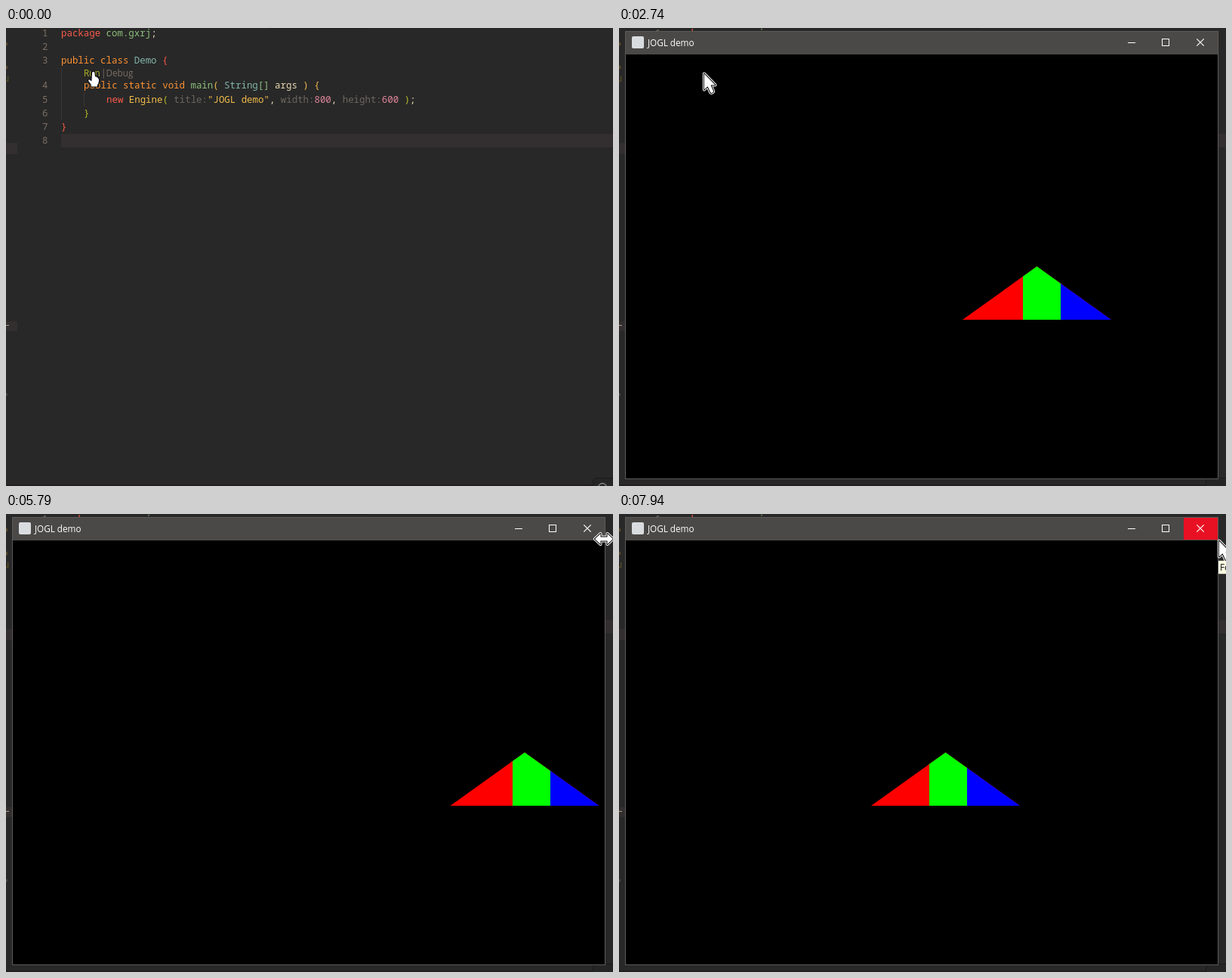
An HTML page for the animation above (8 s loop, 804 by 606 pixels).

```html
<!DOCTYPE html>
<html lang="en">
<head>
<meta charset="utf-8">
<title>JOGL demo</title>
<style>
  html, body { margin: 0; width: 100%; height: 100%; overflow: hidden; background: #282828; }
  svg { display: block; width: 804px; height: 606px; }
  text { white-space: pre; }
  .code { font: 12.42px "Noto Sans Mono", "DejaVu Sans Mono", monospace; fill: #ebdbb2; }
  .ui { font: 11.7px "Open Sans", "Noto Sans", sans-serif; }
  .num { fill: #7c6f64; text-anchor: end; }
  .red { fill: #fb5a4a; }
  .orange { fill: #fe9232; }
  .yellow { fill: #f2bd4b; }
  .green { fill: #b8bb26; }
  .aqua { fill: #8ec07c; }
  .blue { fill: #83b5a8; }
  .pink { fill: #e0869b; }
  .hint { fill: #6e665f; }
  .guide { fill: #3a3735; }
  .line { fill: #332e2f; }
  .crisp { shape-rendering: crispEdges; }
  .icon { fill: none; stroke: #fff; }
  .halo { fill: none; stroke: #fff; stroke-width: 4; stroke-linejoin: round; }
  .body { fill: #fff; stroke: #000; stroke-width: 2; stroke-linejoin: round; paint-order: stroke; }
</style>
</head>
<body>
<svg viewBox="0 0 804 606">
  <defs>
    <clipPath id="view"><rect x="9" y="35" width="784" height="561"/></clipPath>
    <clipPath id="shape"><path id="outline"/></clipPath>
    <path id="arrowPath" d="M1.8 3.5V24.5L6.5 20.3L10.3 28.6Q12.5 29.8 14.2 27L10.5 18.5H16.5Z"/>
    <path id="resizePath" d="M-12 0L-4.5 -7V-2.6H4.5V-7L12 0L4.5 7V2.6H-4.5V7Z"/>
  </defs>

  <rect width="804" height="606" fill="#282828"/>
  <rect x="348" width="132" height="1" fill="#222"/>
  <rect y="604" width="804" height="2" fill="#241e21"/>

  <g id="sidebar">
    <circle cx="0" cy="21" r="2.5" fill="#50452c"/>
    <circle cx="0" cy="52" r="2.5" fill="#50452c"/>
    <text class="ui" x="-3" y="71" fill="#66581f">u</text>
    <rect class="line" y="152" width="15" height="15"/>
    <rect class="line" y="388" width="15" height="13"/>
    <rect y="393" width="4" height="1" fill="#a89984"/>
    <circle cx="0" cy="485" r="2" fill="#4a4846"/>
  </g>

  <g class="crisp">
    <rect class="line" x="73" y="140" width="731" height="18"/>
    <rect class="guide" x="73" y="52" width="1" height="70"/>
    <rect class="guide" x="103" y="85" width="1" height="19"/>
    <rect id="caret" x="73" y="140" width="1" height="18" fill="#ebdbb2"/>
  </g>

  <g class="code" id="numbers"></g>
  <g class="code">
    <text x="73" y="11"><tspan class="red">package </tspan><tspan class="aqua">com.gxrj</tspan>;</text>
    <text x="73" y="47"><tspan class="orange">public class </tspan><tspan class="blue">Demo </tspan><tspan class="red">{</tspan></text>
    <text x="103" y="80"><tspan class="orange">public static void </tspan><tspan class="aqua">main</tspan><tspan class="yellow">( </tspan><tspan class="blue">String</tspan><tspan class="aqua">[]</tspan> args <tspan class="yellow">) {</tspan></text>
    <text x="133" y="99"><tspan class="red">new </tspan><tspan class="yellow">Engine</tspan><tspan class="green">( </tspan><tspan class="hint">title:</tspan><tspan class="yellow">"JOGL demo"</tspan>, <tspan class="hint">width:</tspan><tspan class="pink">800</tspan>, <tspan class="hint">height:</tspan><tspan class="pink">600</tspan><tspan class="green"> )</tspan>;</text>
    <text class="green" x="103" y="117">}</text>
    <text class="red" x="73" y="135">}</text>
  </g>
  <g class="ui" fill="#7c6f64">
    <text class="green" x="103" y="64">Run</text>
    <text x="126" y="64">|</text>
    <text x="132.5" y="64">Debug</text>
  </g>

  <rect x="777.5" y="595.5" width="40" height="30" rx="4" fill="#252525" stroke="#1b1b1b"/>
  <circle id="badge" cx="790" cy="608" r="5.5" fill="none" stroke="#8a8a8a" stroke-width="1.3"/>

  <g id="hand" transform="translate(108 56)">
    <path class="body" d="M6.2 2.4Q8.2 .6 9.4 3L10 8.6Q11.6 7.6 12.4 9.4Q14 9 14.2 11Q15.4 11.2 15 14Q14.6 18 13 19.5V21.5H4.8V19L1.2 14Q.8 12 2.8 12.4L5.4 14.4Z"/>
  </g>

  <g id="window">
    <g class="crisp">
      <rect x="8.5" y="4.5" width="785" height="592" fill="#000" stroke="#5c5b59"/>
      <rect x="9" y="5" width="784" height="30" fill="#4b4947"/>
      <rect id="closeHover" x="748" y="5" width="45" height="29" fill="#e81123"/>
    </g>
    <rect x="17" y="11" width="16" height="16" rx="2" fill="#d9dcdf"/>
    <text class="ui" x="38" y="24" fill="#fff">JOGL demo</text>
    <path class="icon crisp" d="M674 19.5H684M719.5 14.5H728.5V23.5H719.5Z"/>
    <path class="icon" d="M765.3 14.3L774.7 23.7M774.7 14.3L765.3 23.7" stroke-width="1.2"/>
    <g id="triangle" class="crisp" clip-path="url(#view)">
      <g clip-path="url(#shape)">
        <rect y="310" width="804" height="80" fill="#f00"/>
        <rect id="blue" y="310" width="804" height="80" fill="#00f"/>
        <rect id="green" y="310" width="50" height="80" fill="#0f0"/>
      </g>
    </g>
    <g id="tip">
      <rect x="793.5" y="61.5" width="50" height="18" fill="#ffffe1" stroke="#555"/>
      <text class="ui" x="796" y="75" fill="#111">Fermer</text>
    </g>
    <g id="arrow"><use href="#arrowPath" class="halo"/><use href="#arrowPath" class="body"/></g>
    <g id="resize"><use href="#resizePath" class="halo"/><use href="#resizePath" class="body"/></g>
  </g>
</svg>
<script>
  const LOOP = 8000, OPEN = 1400;
  const el = id => document.getElementById(id);
  const show = (id, on) => el(id).setAttribute('visibility', on ? 'inherit' : 'hidden');
  const move = (id, x, y) => el(id).setAttribute('transform', `translate(${Math.round(x)} ${Math.round(y)})`);

  [11, 29, 47, 80, 99, 117, 135, 153].forEach((y, i) => {
    el('numbers').insertAdjacentHTML('beforeend', `<text class="num" x="55.5" y="${y}">${i + 1}</text>`);
  });

  // Screen refresh: [start, interval]
  const refresh = [[1400, 60], [1520, 40], [1560, 640 / 11], [2200, 60], [4780, 800 / 13],
                   [5580, 60], [5640, 50], [5790, 40], [5830, 61], [6440, 60]];
  // Keys: [time, value, ...]
  const apex = [[1426, 401.5], [1520, 412.5], [2740, 553.5], [3040, 589], [3640, 655.5], [3880, 687],
                [4833, 798], [5580, 711], [5790, 687], [6440, 609], [7100, 534], [7280, 511], [7940, 432.5]];
  const pointer = [[2980, 111, 57], [3040, 122, 57], [3340, 330, 105], [3640, 550, 163], [3880, 645, 148],
                   [4720, 778, 63], [5520, 792, 33], [5790, 792, 33], [5850, 784, 22], [6020, 793, 32]];

  function snap(t) {
    const [start, step] = refresh.filter(r => r[0] <= t).pop();
    return start + Math.floor((t - start) / step + 1e-6) * step;
  }

  function at(keys, t) {
    const next = keys.findIndex(k => k[0] > t);
    if (next === 0) return keys[0].slice(1);
    if (next < 0) return keys[keys.length - 1].slice(1);
    const a = keys[next - 1], b = keys[next], f = (t - a[0]) / (b[0] - a[0]);
    return a.slice(1).map((v, i) => v + (b[i + 1] - v) * f);
  }

  function drawTriangle(t) {
    const [x] = at(apex, t);
    const stripe = Math.round(391 + 1.02 * (x - 412.5));
    el('outline').setAttribute('d', `M${x} 315.5L${x + 98.5} 386H${x - 98.5}Z`);
    el('green').setAttribute('x', stripe);
    el('blue').setAttribute('x', stripe + 50);
  }

  function draw(time) {
    const open = time >= OPEN;
    show('window', open);
    show('hand', !open);
    show('caret', (time >= 120 && time < 590) || time >= 1150);
    show('badge', time < 210);
    if (!open) return;

    const t = snap(time);
    const resizing = t >= 5510 && t < 5840;
    show('triangle', t >= 1450);
    drawTriangle(t);
    show('closeHover', t >= 5840);
    show('tip', t >= 7630);
    show('arrow', !resizing);
    show('resize', resizing);
    move(resizing ? 'resize' : 'arrow', ...at(pointer, t));
  }

  const start = performance.now();
  function tick() {
    draw((performance.now() - start) % LOOP);
    requestAnimationFrame(tick);
  }
  tick();
</script>
</body>
</html>
```
